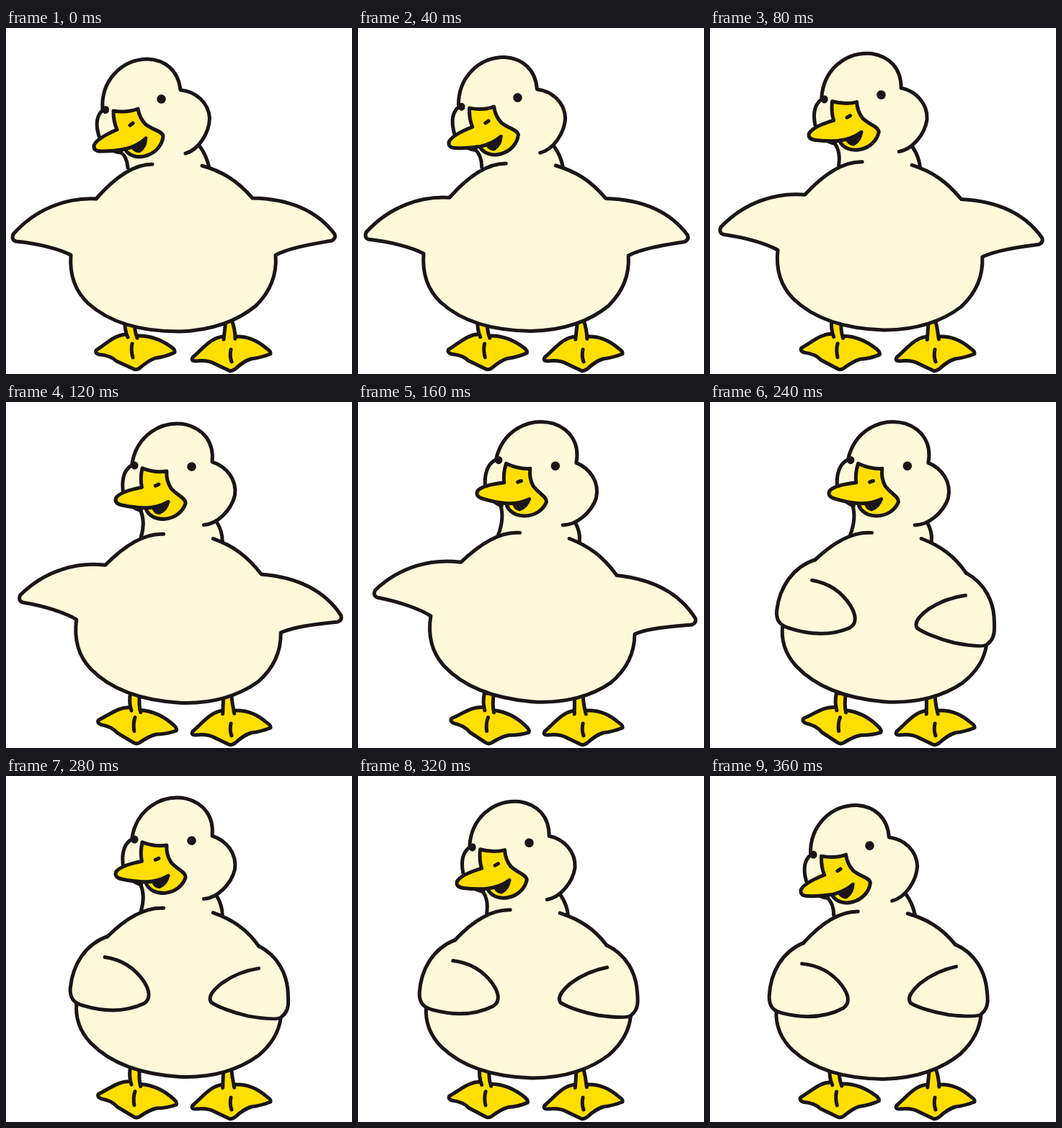
An HTML page for the animation above (0.4 s loop, 480 by 480 pixels).

```html
<!DOCTYPE html>
<html>
<head>
<meta charset="utf-8">
<title>Dancing duck</title>
<style>
  html, body { margin: 0; width: 100%; height: 100%; overflow: hidden; background: #fff; }
  svg { display: block; width: 100vw; height: 100vh; }
  svg * { stroke-linecap: round; stroke-linejoin: round; }
  .skin { fill: #fff9da; }
  .bill { fill: #ffde00; }
  .line { fill: none; }
  .ink { fill: #1a1517; stroke: none; }
</style>
</head>
<body>
<svg viewBox="0 0 480 480" stroke="#1a1517" stroke-width="5">
  <g id="leftFoot">
    <path class="bill" d="M168 425C152 425 142 436 125 447Q123 451 129 453Q145 454 153 462L177 473Q181 475 185 472Q198 461 207 458Q222 456 234 450Q235 447 230 443Q207 426 182 427Z"/>
    <path class="bill" d="M169 429Q164 418 165 405L178 405Q178 420 182 430"/>
    <path class="line" d="M175 438Q173 447 176 457"/>
  </g>
  <g>
    <path class="bill" d="M303 428C285 428 273 445 259 457Q256 462 263 462Q280 460 290 466L309 475Q313 477 318 473Q330 462 340 459Q355 457 367 452Q368 449 362 445Q342 427 318 428Z"/>
    <path id="rightLeg" class="bill"/>
    <path class="line" d="M312 446Q310 455 313 463"/>
  </g>

  <path id="neckFill" class="skin" stroke="none"/>
  <path id="neckLines" class="line"/>

  <g id="body">
    <path id="wingsOut" class="skin" d="M203 189C178 189 152 206 125 237C85 235 42 250 10 286Q7 294 14 296C45 299 75 307 90 315C88 342 96 365 114 382C145 410 190 421 240 421C287 420 323 405 347 385C369 363 376 340 374 315C395 304 430 299 452 295Q458 292 456 286C432 254 395 237 342 236C320 211 300 199 272 191"/>
    <g id="wingsIn">
      <path class="skin" d="M203 189C178 189 152 206 128 233Q95 265 91 327C90 350 98 367 114 382C145 410 190 421 240 421C287 420 323 405 347 385C366 367 374 348 375 330Q375 265 338 233C320 211 300 199 272 191"/>
      <path class="skin" d="M128 233C98 246 82 275 81 308C81 322 87 328 100 331C130 338 160 336 184 323C194 316 191 304 182 292C168 274 150 264 126 262"/>
      <path class="skin" d="M338 233C368 246 379 272 382 290C385 310 386 320 376 329C372 334 350 333 330 331C305 327 285 320 277 315C272 308 278 299 290 288C306 275 322 268 340 264"/>
    </g>
  </g>

  <g id="head">
    <path class="skin" d="M249 174C267 169 282 146 282.500 125C281 103 263 88 242 86C239 58 220 44 196 43C160 44 131 73 134 114C124 123 125 137 129 150Q138 171 160 173"/>
    <circle class="ink" cx="215.500" cy="98.500" r="6.300"/>
    <ellipse class="ink" cx="138" cy="113.500" rx="5" ry="5.500"/>
    <path class="bill" d="M149 115Q168 118 183 112Q185 125 194 134C205 142 217 143 218 150C217 162 208 173 195 177C183 181 171 178 165 168Q150 171 132 171Q121 171 122 163C125 155 140 147 154 141Q149 130 149 115Z"/>
    <path class="line" d="M165 168Q182 164 194 153"/>
    <path class="ink" d="M173 166Q187 161 196 152Q197 165 186 173Q178 174 173 166"/>
    <path class="line" d="M172 135L176 132"/>
  </g>
</svg>
<script>
  const STEP = 40, STEPS = 10;
  const el = id => document.getElementById(id);

  function turn(id, degrees, x, y) {
    el(id).setAttribute("transform", `rotate(${degrees} ${x} ${y})`);
  }

  function draw(time) {
    const step = Math.floor(time / STEP) % STEPS;
    const sway = (1 - Math.cos(2 * Math.PI * step / STEPS)) / 2;
    const mix = (a, b) => a + (b - a) * sway;
    const point = (x0, y0, x1, y1) => `${mix(x0, x1)} ${mix(y0, y1)}`;

    turn("head", 18.5 * sway, 278, 292);
    turn("body", 5.6 * sway, 300, 430);
    turn("leftFoot", 9.5 * sway, 180, 474);

    const leftTop = point(158, 171, 202, 140);
    const leftCurve = `Q${point(168, 178, 207, 160)} ${point(169, 194, 197, 184)}`;
    const rightTop = point(268, 163, 305, 168);
    const rightBase = point(282, 194, 310, 194);
    const rightCurve = `Q${point(278, 176, 312, 181)} ${rightBase}`;
    el("neckLines").setAttribute("d", `M${leftTop}${leftCurve}M${rightTop}${rightCurve}`);
    el("neckFill").setAttribute("d",
      `M${leftTop}${leftCurve}L${point(203, 215, 228, 207)}L${rightBase}L${rightTop}Z`);

    el("rightLeg").setAttribute("d",
      `M${point(302, 432, 300, 433)}L${point(305, 405, 300, 405)}` +
      `L${point(313, 405, 312, 405)}Q${point(318, 418, 312, 420)} ${point(318, 431, 316, 433)}`);

    const out = step < STEPS / 2;
    el("wingsOut").style.display = out ? "" : "none";
    el("wingsIn").style.display = out ? "none" : "";
  }

  function loop() {
    draw(performance.now());
    requestAnimationFrame(loop);
  }
  loop();
</script>
</body>
</html>
```
